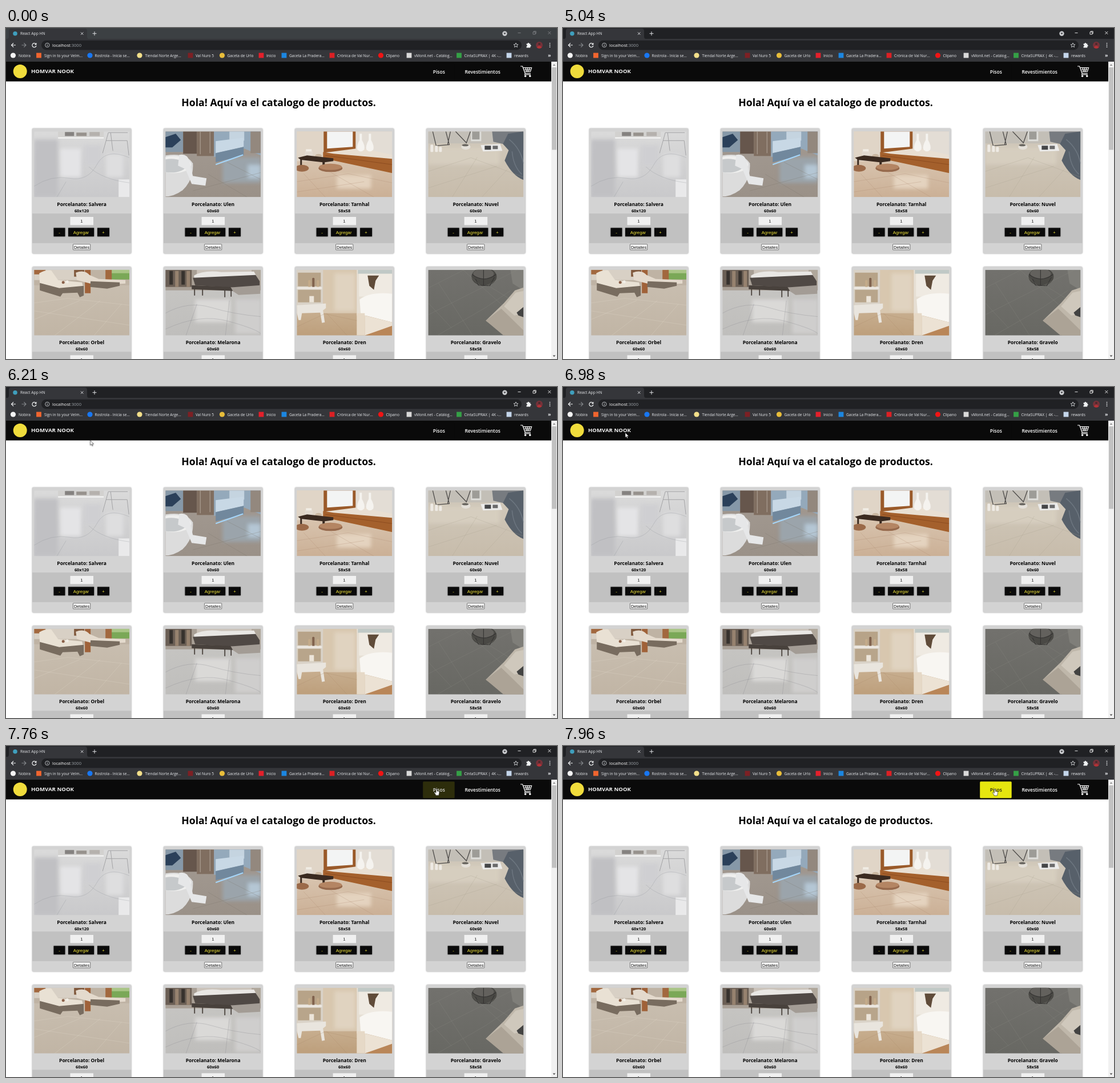
Recreate the animation shown at these times as an HTML page. Size 965 px wide and 580 px high, loop 8000 ms.

```html
<!DOCTYPE html>
<html lang="es">
<head>
<meta charset="utf-8">
<title>React App HN</title>
<style>
html, body { margin: 0; width: 100%; height: 100%; overflow: hidden; background: #fff; }
#stage { display: block; position: absolute; left: 0; top: 0; width: 965px; height: 580px; }
text { font-family: "Open Sans", "Noto Sans", sans-serif; white-space: pre; }
.mid { text-anchor: middle; }
.bold { font-weight: 700; }
.small { font-size: 6.65px; fill: #e8eaed; }
.nav { font-size: 8.45px; font-weight: 600; fill: #fff; }
.form { font-family: "Liberation Sans", Arial, sans-serif; font-size: 7.8px; }
.card { fill: #d3d3d3; filter: drop-shadow(0 0 1.2px #999); }
.btn { fill: #0a0a0a; filter: drop-shadow(0 .5px .8px #777); }
.soft { filter: blur(3px); }
.joint { opacity: .4; }

#strip, #controls, #arrow, #hand, #hover, #pisos {
  animation-duration: 8s;
  animation-timing-function: step-end;
  animation-iteration-count: infinite;
}
#strip { animation-name: strip; }
#controls { animation-name: controls; }
#arrow { animation-name: arrow; }
#hand { animation-name: hand; }
#hover { animation-name: hover; }
#pisos { animation-name: pisos; }

@keyframes strip { 0% { fill: #3c4043; } 63%, 100% { fill: #202124; } }
@keyframes controls { 0% { stroke: #808387; } 63%, 100% { stroke: #f4f4f4; } }
@keyframes arrow {
  0% { transform: translate(-30px, -30px); }
  67.875% { transform: translate(480px, 467px); }
  68.875% { transform: translate(432.5px, 169.5px); }
  70% { transform: translate(-30px, -30px); }
  75% { transform: translate(207px, 110px); }
  76.25% { transform: translate(181px, 103px); }
  77.625% { transform: translate(147.5px, 93.5px); }
  78.75% { transform: translate(115px, 82px); }
  79.75% { transform: translate(97.5px, 77.5px); }
  87.25% { transform: translate(109px, 80px); }
  88.5% { transform: translate(180px, 87px); }
  89.625% { transform: translate(312px, 93px); }
  91% { transform: translate(485px, 95px); }
  92.375% { transform: translate(628px, 94px); }
  93.5% { transform: translate(681px, 94.5px); }
  94.625% { transform: translate(713px, 94px); }
  95.75% { transform: translate(736px, 93px); }
  97%, 100% { transform: translate(-30px, -30px); }
}
@keyframes hand {
  0% { transform: translate(-30px, -30px); }
  97% { transform: translate(754px, 74.5px); }
  98.375% { transform: translate(756px, 74.8px); }
  99.5%, 100% { transform: translate(756.5px, 75px); }
}
@keyframes hover {
  0% { fill: #0a0a0a; }
  97% { fill: #2d2d0b; }
  98.375% { fill: #9a9a0d; }
  99.5%, 100% { fill: #e6e60f; }
}
@keyframes pisos {
  0% { fill: #fff; }
  97% { fill: #dcdcdc; }
  98.375% { fill: #6a6a6a; }
  99.5%, 100% { fill: #24240c; }
}
</style>
</head>
<body>
<svg id="stage" viewBox="0 0 965 580" xmlns="http://www.w3.org/2000/svg"></svg>
<script>
const rect = (x, y, w, h, fill, more = '') =>
  `<rect x="${x}" y="${y}" width="${w}" height="${h}" fill="${fill}" ${more}/>`;
const oval = (x, y, rx, ry, fill) => `<ellipse cx="${x}" cy="${y}" rx="${rx}" ry="${ry}" fill="${fill}"/>`;
const dot = (x, y, r, fill) => oval(x, y, r, r, fill);
const area = (d, fill, more = '') => `<path d="${d}" fill="${fill}" ${more}/>`;
const line = (d, stroke, w = 1, more = '') =>
  `<path d="${d}" fill="none" stroke="${stroke}" stroke-width="${w}" ${more}/>`;
const text = (x, y, s, cls = '', more = '') => `<text x="${x}" y="${y}" class="${cls}" ${more}>${s}</text>`;
const glow = (x, y, w, h, fill) => rect(x, y, w, h, fill, 'class="soft"');
const joints = (d, stroke) => line(d, stroke, .7, 'class="joint"');

let defs = '';
function fade(from, to) {
  const id = 'g' + defs.length;
  defs += `<linearGradient id="${id}" x2="0" y2="1"><stop stop-color="${from}"/>` +
    `<stop offset="1" stop-color="${to}"/></linearGradient>`;
  return `url(#${id})`;
}
const ground = (from, to) => rect(0, 0, 167, 115, fade(from, to));

function browser() {
  const marks = [
    [12.5, 22, 'Nobira', '#f4f4f4', 1],
    [57.5, 67, 'Sign in to your Velm...', '#f0652f', 0],
    [147, 155.5, 'Rostrola - Inicia se...', '#1877f2', 1],
    [234, 243.5, 'Tiendal Norte Arge...', '#f3df8a', 1],
    [323, 332, 'Val Nuro 5', '#7d2024', 0],
    [378.5, 387.5, 'Gaceta de Urlo', '#e8bd3a', 1],
    [447, 456, 'Inicio', '#e3202b', 0],
    [487, 496, 'Gaceta La Pradera...', '#1c86e0', 0],
    [571, 580, 'Crónica de Val Nur...', '#dc2024', 0],
    [656.5, 665.5, 'Clipano', '#f01414', 1],
    [706, 715, 'vMonil.net - Catálog...', '#d9d9d9', 0],
    [793.5, 802.5, 'CintaSUPRAX | 4K -...', '#35a046', 0],
    [881, 890, 'rewards', '#c4d5ea', 0]
  ];
  return rect(0, 0, 965, 20, '#202124', 'id="strip"') +
    area('M1 19.5Q5 19 5 15V5Q5 1 9 1H138Q142 1 142 5V15Q142 19 146 19.5Z', '#35363a') +
    rect(0, 19, 965, 40, '#35363a') +
    dot(16, 9.7, 3.8, '#3f9fbd') +
    text(25, 12.2, 'React App HN', 'small', 'style="font-size:6.8px"') +
    line('M131 7.5l4.4 4.4m0-4.4l-4.4 4.4', '#e8eaed', .9) +
    line('M151.5 9.7h7m-3.5-3.5v7', '#e0e2e5', 1) +
    dot(873.5, 9.7, 4.2, '#c9cbce') + area('M871.4 8.5h4.2l-2.1 2.7z', '#303134') +
    `<g id="controls" fill="none" stroke-width=".9"><path d="M896.5 8.6h5M923 7h4v4h-4zM924.2 7V5.8h4v4H927M949.3 6l5 5m0-5l-5 5"/></g>` +
    line('M17 30H9.5m3.6-3.6L9.5 30l3.6 3.6', '#f1f3f4', 1.2) +
    line('M27.5 30H35m-3.6-3.6L35 30l-3.6 3.6', '#85888c', 1.2) +
    line('M52.4 28A3.6 3.6 0 1 0 53 31', '#f1f3f4', 1.2) + area('M53.5 25.8v3.7h-3.7z', '#f1f3f4') +
    rect(62, 21.8, 841, 16.6, '#202124', 'rx="8.3"') +
    `<circle cx="72.3" cy="30" r="3.7" fill="none" stroke="#dadce0" stroke-width=".8"/>` +
    line('M72.3 29.5v2.5M72.3 27.8v.9', '#dadce0', .9) +
    text(81, 32.8, 'localhost<tspan fill="#9aa0a6">:3000</tspan>', '', 'font-size="7.57" fill="#fff"') +
    line('M893 26.2l1.1 2.6 2.8.2-2.1 1.8.7 2.8-2.5-1.5-2.5 1.5.7-2.8-2.1-1.8 2.8-.2z', '#e8eaed', .8) +
    area('M911.5 27.5h2a1.4 1.4 0 1 1 2.8 0h2v2.2a1.4 1.4 0 1 1 0 2.8v2h-6.8v-2.3a1.3 1.3 0 1 0 0-2.6z', '#f1f3f4') +
    dot(934, 30, 6, '#75323a') + area('M929.5 34q4.5-6 9 0-4.5 4-9 0z', '#b23236') + dot(934, 28, 2, '#4b2a2b') +
    [26.8, 30, 33.2].map(y => dot(952.5, y, .9, '#e8eaed')).join('') +
    marks.map(([ix, tx, s, c, round]) =>
      (round ? dot(ix, 48, 4.6, c) : rect(ix - 4.4, 43.6, 8.8, 8.8, c)) + text(tx, 50.6, s, 'small')).join('') +
    text(949, 50.8, '»', 'small bold', 'style="font-size:9px"');
}

function header() {
  return rect(0, 59, 955, 34.6, '#0a0a0a') +
    dot(24.7, 76, 12, '#f0dc3c') +
    text(44, 79.4, 'HOMVAR NOOK', 'bold', 'font-size="9.65" fill="#f2f2f2"') +
    rect(730.2, 62.2, 55.5, 29, '#0a0a0a', 'id="hover" rx="1.5"') +
    text(758.3, 80.2, 'Pisos', 'nav mid', 'id="pisos"') +
    text(834.7, 80.2, 'Revestimientos', 'nav mid') +
    line('M901 67h3.6l4.6 12.8h9.6M905.6 69.6h15l-2.3 7.2h-10.2M906.7 73.2h12.6M910 69.6l1.7 7.2M913.5 69.6v7.2M917 69.6l-1.6 7.2', '#fff', 1.15) +
    line('M909.2 79.8l-1.2 2h11', '#fff', 1) +
    dot(909.6, 84.2, 1.7, '#fff') + dot(917.7, 84.2, 1.7, '#fff');
}

const photos = [
  // white marble hall
  () => ground('#dadada', '#c9c9cb') + glow(0, 14, 42, 101, '#c0c0c3') + glow(46, 30, 36, 50, '#e4e4e6') +
    glow(88, 24, 30, 36, '#cfcfd2') + glow(126, 40, 30, 40, '#dededf') +
    rect(42, 0, 80, 13, '#d2d1cf') + rect(54, 1, 16, 7, '#858280') + rect(74, 2, 18, 6, '#97928d') +
    rect(97, 1, 18, 7, '#b5b1ad') + rect(42, 10, 80, 2.5, '#f2f2f2') +
    rect(148, 84, 19, 31, '#e9e9ea') +
    line('M0 96Q30 76 62 82T110 58 167 46M40 115L56 88M96 62Q120 84 167 90', '#8f9196', .8, 'class="joint"') +
    line('M120 38L130 2H164M126 16H163L166 42M134 2L138 34', '#a3a3a5', 1),

  // bathroom
  () => ground('#a39a92', '#9a9188') + glow(100, 45, 67, 45, '#9ba4ab') +
    rect(0, 0, 31, 36, '#8698a8') + area('M0 10L18 4 27 15 12 28H0z', '#2b405a') +
    rect(31, 0, 24, 39, '#66564c') + rect(55, 0, 30, 43, '#806e60') + line('M61 0V40M78 0V38', '#b3a69a', 1) +
    area('M85 0H167V42L138 30 85 45z', '#94a9bb') + rect(112, 0, 26, 16, '#c5d4e0') + rect(149, 0, 18, 38, '#93887e') +
    area('M88 17L137 11V27L88 38z', '#c8d8e5') + area('M88 38L137 27V42L88 54z', '#71889d') +
    line('M88 58L136 41', '#a5d6fa', 2) + glow(144, 58, 23, 24, '#b4c6d4') +
    area('M0 42Q36 36 48 56Q50 84 30 103Q15 114 0 114z', '#dcdcdc') + oval(14, 58, 31, 15, '#efefee') +
    oval(10, 60, 26, 12, '#c6c9cb') +
    area('M24 41Q38 38 42 52L48 78 72 82 70 95 46 92 35 66 22 60z', '#e6e7e8') +
    joints('M48 104L167 72M75 75L143 115M108 54L167 84', '#786f67'),

  // tea room
  () => ground('#e2d3c1', '#cbb096') + rect(0, 0, 49, 52, '#e0d5c7') + rect(100, 0, 67, 48, '#e3ddd5') +
    glow(70, 76, 60, 24, '#e4d3bf') +
    area('M47 0H103V33L47 37z', '#9a5a2a') + area('M53 0H98V27L53 30z', '#f3f4f4') +
    area('M50 37L112 29 167 41V50L63 41z', '#e9dfd2') + area('M46 36L64 39 167 48V73L46 47z', '#a4602c') +
    line('M50 42L167 58', '#7c3f19', .6) +
    [112, 128].map(x => area(`M${x - 2} 4h4v11q6 10 4 17-6 6-12 0-2-7 4-17z`, '#f5f3ef')).join('') +
    rect(14, 34, 14, 13, '#e2dad0', 'rx="3"') + rect(16, 31, 10, 4, '#f0ece4') + oval(38, 43, 6, 3.5, '#c9b6a0') +
    area('M2 46L18 42 64 47V52L49 54V63H45V54L9 50V59H6V49z', '#3a2a20') +
    oval(59, 64.5, 21, 6.5, '#96694c') + oval(59, 62, 20, 5.5, '#b48563') + oval(9, 64.5, 12, 6, '#9b6a49') +
    joints('M0 88L90 74 167 90M60 72L135 115M12 74L50 115M0 106L118 88', '#a8866b'),

  // cream floor with blanket
  () => ground('#d2cabd', '#c7bcab') + rect(0, 0, 167, 21, '#c3bfb7') + glow(0, 28, 125, 30, '#d6cebf') +
    line('M8 0L14 25 37 23 31 0M39 0L34 23M48 0L67 20 74 0', '#4c4a48', 1.3) +
    rect(75, 0, 18, 17, '#dededa') + rect(77, 0, 13, 14, '#9d9c97') + oval(66, 27, 8, 5, '#e4e0d9') + oval(65, 24, 6, 2, '#6a6761') +
    [4, 12, 19].map((x, i) => rect(x, 23 + i * 2, 5, 13 - i * 2, '#eeeae4', 'rx="1.5"')).join('') +
    area('M92 24L126 22 130 34 96 35z', '#ececeb') + rect(99, 25, 11, 7, '#454648') + rect(113, 25, 9, 6, '#6a6a6b') +
    area('M112 0H167V33L140 24 114 18z', '#777b80') +
    area('M140 4L167 0V85Q148 78 134 51L141 33 131 22z', '#57606a') +
    line('M142 14Q162 30 167 56M147 35Q149 61 164 75', '#6d7680', 1.5) +
    joints('M0 70L75 46 167 80M42 115L86 45M0 99L120 61M94 115L139 66', '#a79d8e'),

  // terrace
  () => ground('#cac0b2', '#c1b5a5') + rect(0, 0, 167, 27, '#bfb3a4') + rect(0, 0, 92, 18, '#d8d0c5') +
    rect(133, 0, 34, 17, '#7aa857') + rect(133, 0, 34, 6, '#a9c586') + rect(0, 0, 20, 8, '#a2683f') +
    rect(70, 0, 18, 12, '#80593d') + rect(125, 0, 11, 24, '#a2683f') + rect(89, 0, 10, 41, '#a06239') +
    area('M9 6Q19 0 30 1L42 18 84 22 86 31 45 35 10 25z', '#e9e1d4') +
    area('M10 23L44 32 87 28V45L80 48 76 40 50 41 46 47 10 36z', '#786c5f') +
    area('M73 5Q88 -1 97 9L113 16 160 18V24L110 27 75 18z', '#e4dacd') +
    area('M99 20L150 22V28L128 33 98 30z', '#786c5f') +
    dot(51, 22, 2.5, '#8a6049') + dot(58, 21, 2.5, '#f2efe8') +
    joints('M0 58L59 50 167 62M0 87L80 54M36 115L116 54M105 115L153 60M0 72L167 97', '#e2dace'),

  // bedroom
  () => ground('#c8c7c4', '#bfbebc') + rect(0, 0, 167, 36, '#a89f95') + rect(0, 0, 46, 30, '#6b5f55') +
    [7, 17, 28, 37].map((x, i) => rect(x, 2, 6, 24 + i % 2 * 4, i % 2 ? '#96826f' : '#37322e')).join('') +
    rect(55, 0, 96, 10, '#cbc3ba') + rect(152, 0, 15, 30, '#b0a79b') +
    glow(52, 52, 62, 40, '#dad9d7') + glow(122, 52, 45, 60, '#cfcecd') +
    area('M50 10Q68 0 98 4L155 3 161 14V24L51 22z', '#e9e7e4') + area('M48 14L158 9 165 20V34L52 27z', '#504945') +
    area('M112 31L166 27V42L128 44 116 36z', '#a39c95') +
    area('M46 27L114 30 118 37 46 34z', '#48413c') +
    line('M51 33V45M65 34V45M104 35V48M115 36V47', '#48413c', 1.8) +
    line('M0 76Q40 54 80 66T167 82M0 104Q60 76 110 90T167 112M55 60L36 115M112 54L105 115', '#85858a', .8, 'class="joint"'),

  // powder room
  () => ground('#d9c8b0', '#bd9f7c') + rect(46, 0, 60, 76, '#d8c7af') + glow(66, 6, 36, 66, '#e0d3c0') +
    rect(105, 0, 62, 80, '#e6dfd4') + rect(107, 0, 60, 7, '#c0c9c6') + rect(109, 7, 58, 40, '#efeae2') +
    area('M110 52Q128 38 167 42V92L112 78z', '#f8f6f2') + area('M124 10H144L138 19 135 35 127 28z', '#604c3a') +
    rect(0, 0, 46, 66, '#d9d2c7') + rect(2, 5, 40, 24, '#b7a388') + rect(2, 35, 40, 22, '#b8a58b') +
    [20, 27, 35].map((x, i) => rect(x, 18 - i % 2 * 4, 4, 13 + i % 2 * 4, i === 1 ? '#80624d' : '#c4ab8a', 'rx="1.5"')).join('') +
    rect(22, 46, 8, 11, '#ece5da') + rect(0, 30, 44, 4, '#ece7e0') +
    area('M0 62L51 59V67L46 71 49 92 44 93 41 75 9 76 7 88 3 88 0 75z', '#e9e5de') +
    rect(105, 76, 14, 39, '#e6d9c7') + area('M119 80L167 92V100L119 115z', '#ece2d4') +
    area('M119 115L167 98V115z', '#b98658') + joints('M0 100L49 77 105 89M52 76L88 115', '#a68667'),

  // slate floor
  () => ground('#72716d', '#686863') + area('M144 0H167V36L148 24z', '#7f7e79') +
    oval(98, 12, 22, 16, '#4a4945') + oval(97, 7, 18, 9, '#63615d') +
    line('M77 8Q97 24 119 8M83 16L88 27 108 28 116 13M97 0V27', '#343332', 1.1) +
    area('M101 89L133 58 152 36 167 31V115H135z', '#bfb7aa') + area('M133 64L153 40 167 37V77L151 80z', '#cfc8bc') +
    area('M101 89L128 68 167 106V115H132z', '#aca396') + area('M155 75L167 65V83L158 80z', '#434342') +
    joints('M0 32L63 0M0 79L95 31 157 0M16 115L101 66 145 36M18 23L78 115M61 0L132 64M0 58L41 102M104 27L143 51', '#8c8b86')
];

const names = ['Salvera', 'Ulen', 'Tarnhal', 'Nuvel', 'Orbel', 'Melarona', 'Dren', 'Gravelo'];
const sizes = ['60x120', '60x60', '58x58', '60x60', '60x60', '60x60', '60x60', '58x58'];

function button(x, w, label) {
  return rect(x, 350.3, w, 15, '', 'class="btn"') +
    text(x + w / 2, 360.8, label, 'form mid', 'fill="#f2e63c"');
}

function card(name, i) {
  const dx = i % 4 * 230.05, dy = i > 3 ? 242.4 : 0;
  return `<g transform="translate(${dx} ${dy})">` +
    rect(46, 176, 173.3, 219.3, '', 'class="card" rx="2"') +
    `<svg x="49.2" y="181.3" width="167" height="115">${photos[i]()}</svg>` +
    text(132.6, 311.7, 'Porcelanato: ' + name, 'bold mid', 'font-size="8.47"') +
    text(132.6, 323.1, sizes[i], 'bold mid', 'font-size="7.4"') +
    rect(46, 325, 173.3, 52, '#c1c1c1') +
    rect(112.5, 331, 40.5, 14.3, '#f0f0f0') + text(132.3, 341.2, '1', 'form mid', 'fill="#222"') +
    button(83.5, 20, '-') + button(109, 45.2, 'Agregar') + button(160, 21, '+') +
    rect(117.5, 378.8, 30.2, 10, '#f8f8f8', 'stroke="#555" stroke-width=".8" rx=".6"') +
    text(132.6, 386.6, 'Detalles', 'form mid', 'fill="#111" style="font-size:7.6px"') + '</g>';
}

const scrollbar = rect(955, 59, 10, 521, '#f1f1f1') + rect(956, 69, 8, 144.5, '#c1c1c1') +
  area('M957.6 66l2.4-2.8 2.4 2.8z', '#8a8a8a') + area('M957.6 573.5l2.4 2.8 2.4-2.8z', '#505050');

const pointers =
  area('M0 0V8.6L2 6.8 3.4 9.9 4.8 9.3 3.4 6.3H6.2Z', '#fff', 'id="arrow" stroke="#222" stroke-width=".7"') +
  area('M-1 .8Q0-.5 1 .8V4.4L4 5Q5.2 5.3 5 7L4.2 10.2V12H-1.6V10.7L-4 7.2Q-4.2 5.8-2.7 6.2L-1 7.7Z', '#fff',
    'id="hand" stroke="#222" stroke-width=".65"');

const picture = browser() + rect(0, 59, 955, 521, '#fff') + header() +
  text(477.6, 136.7, 'Hola! Aquí va el catalogo de productos.', 'bold mid', 'font-size="17.65"') +
  names.map(card).join('') + scrollbar + pointers;
document.getElementById('stage').innerHTML = `<defs>${defs}</defs>` + picture;
</script>
</body>
</html>
```
